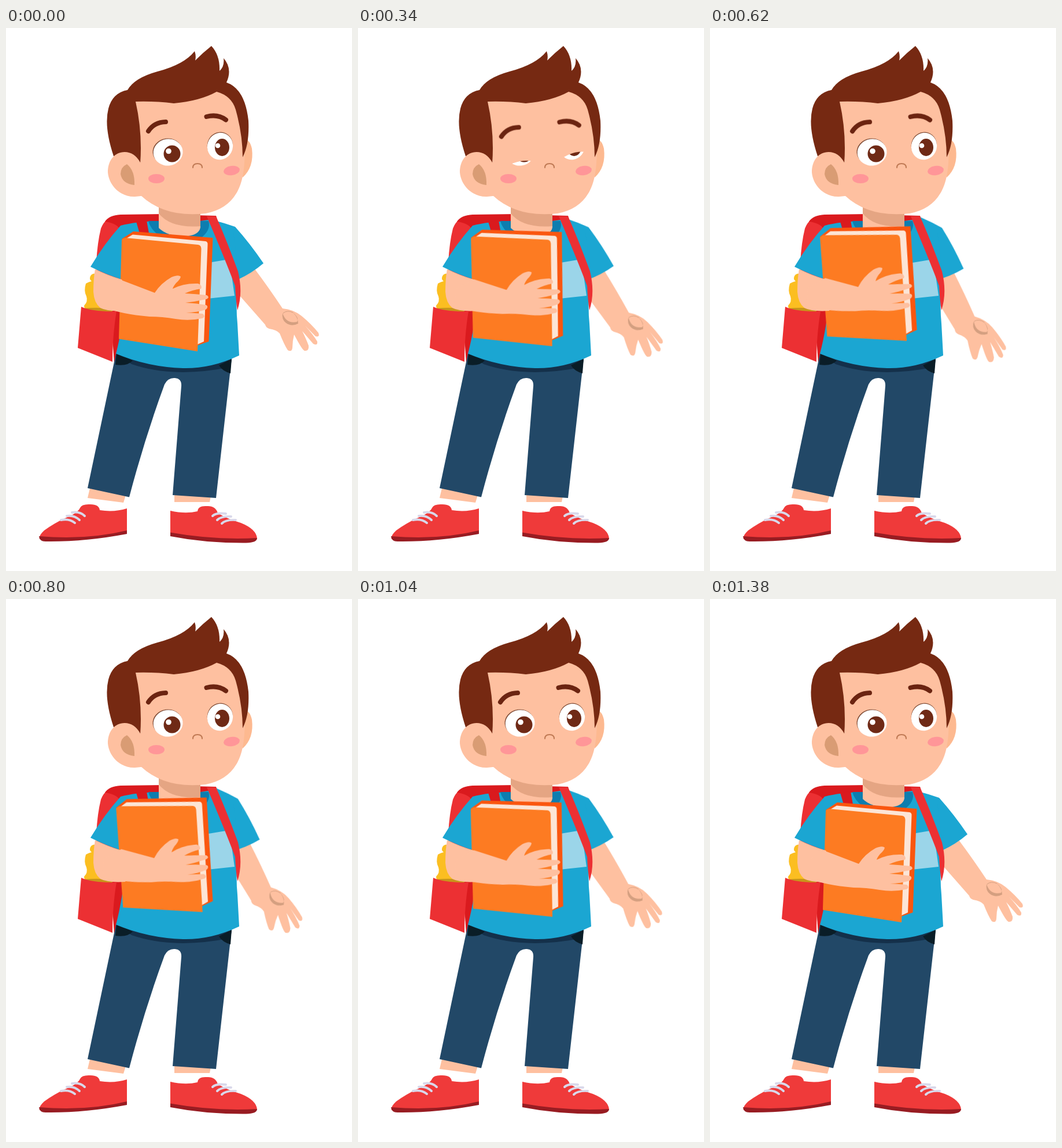
An HTML page that plays this animation: 598x937 px, repeating every 1400 ms.

```html
<!DOCTYPE html>
<html lang="en">
<head>
<meta charset="utf-8">
<title>Schoolboy with a book</title>
<style>
  html, body { margin: 0; width: 100%; height: 100%; overflow: hidden; background: #fff; }
  svg { display: block; width: 100%; height: 100%; }

  .skin { fill: #fec0a0; }
  .shade { fill: #e5a583; }
  .hair { fill: #762912; }
  .shirt { fill: #1ba6d2; }
  .collar { fill: #0d7daf; }
  .red { fill: #ec3033; }
  .deep { fill: #da1a1e; }
  .shoe { fill: #ef3a3a; }
  .sole { fill: #981c22; }
  .pants { fill: #224867; }
  .white { fill: #fff; }
  .iris { fill: #6f2a16; }
  .lash { fill: #7a4630; }
  .blush { fill: #ff9698; }
  .line { fill: none; stroke-linecap: round; }
  .brow { stroke: #6b2411; stroke-width: 8; }
  .lace { stroke: #d9d8ea; stroke-width: 4; }

  .swing { animation: 700ms cubic-bezier(.37, 0, .63, 1) infinite alternate; }
  #reach { transform-origin: 388px 372px; animation-name: reach; }
  .hold { transform-origin: 157px 461px; animation-name: hold; }
  @keyframes reach { to { transform: rotate(10.2deg); } }
  @keyframes hold { to { transform: rotate(-6deg); } }

  .lid, .frown { animation: 1400ms cubic-bezier(.37, 0, .63, 1) infinite; }
  .lid { animation-name: blink; }
  .frown { animation-name: frown; }
  @keyframes blink {
    0%, 14.3%, 45.7%, 100% { transform: none; }
    27.1%, 28.6% { transform: translateY(56px); }
  }
  @keyframes frown {
    0%, 14.3%, 45.7%, 100% { transform: none; }
    27.1%, 28.6% { transform: translate(2px, 10.5px); }
  }
</style>
</head>
<body>
<svg viewBox="0 0 598 937">
  <defs>
    <clipPath id="left"><circle cx="280" cy="214" r="29"/></clipPath>
    <clipPath id="right"><circle cx="370" cy="204" r="27"/></clipPath>
  </defs>

  <!-- backpack -->
  <path class="red" d="M156 405 Q158 370 164 346 Q172 325 195 323 L230 330 L230 480 L156 480Z"/>
  <path class="deep" d="M171 334 Q178 323 198 322 L275 321 V345 H195 Q190 337 171 334Z M325 323 L363 324 L368 340 H325Z"/>
  <path class="deep" d="M180 480 H215 L196 575 L187 577Z"/>
  <path fill="#fbbe21" d="M146 428 Q149 423 156 424 L185 440 L183 488 H146 Q134 486 135 479 Q142 472 139 463 Q134 454 138 441 Q143 438 148 437 Q143 433 146 428Z"/>
  <path fill="#c8961b" d="M134 484 Q160 481 184 485 V490 H138Z"/>
  <path class="red" d="M130 481 Q150 490 191 489 Q184 530 184 576 L124 552Z"/>

  <!-- legs and shoes -->
  <path class="skin" d="M145 794 L141 811 L203 819 L207 806Z M291 805 V818 L352 818 L354 808Z"/>
  <path class="pants" d="M190 562 L141 794 L213 809.500 Q240 707 274 615 Q280 603 292 604 Q304 605 303 618 L288 806 L363 811 L390 570Z"/>
  <path fill="#14304a" d="M191 562 Q290 590 390 570 L388 585 Q290 605 217 580Z"/>
  <path fill="#0a1d27" d="M191 561 L219 574 Q210 584 189 581Z M368 582 L390 571 L388 596 Q374 592 368 582Z"/>
  <path class="shoe" d="M128 828 Q131 821 146 822 Q161 822 162 832 Q187 836 209 829 V872 Q130 888 58 882 Q56 876 66 867 Q84 854 104 845 Q124 837 128 828Z"/>
  <path class="sole" d="M57 877 Q140 884 209 867 V873 Q135 887 68 886 Q58 886 57 877Z"/>
  <path class="shoe" d="M284 833 Q310 839 331 834 Q332 824 347 825 Q362 824 366 837 Q382 847 406 854 Q433 865 434 881 Q350 888 284 874Z"/>
  <path class="sole" d="M284 870.500 Q360 884 434 880 Q434 888 415 888.500 Q345 889 284 877Z"/>
  <g class="line lace">
    <path d="M95 849 Q109 846 119 854 M105 842 Q118 840 127 849 M114 836 Q128 834 136 842"/>
    <path d="M357 842 Q363 836 380 838 M365 849 Q372 842 389 843 M373 855 Q380 848 397 849"/>
  </g>

  <!-- free arm -->
  <g id="reach" class="swing">
    <path class="skin" d="M395 400 L430 416 Q454 448 478 484 Q498 486 511 497 Q528 511 540 526 Q543 534 535 532 L517 514 Q531 529 538 541 Q539 549 531 545 L512 523 Q519 537 523 548 Q524 558 516 557 Q512 556 498 529 Q495 540 495 552 Q494 560 487 556 Q481 547 473 527 Q468 521 455 519 Q449 517 448 512 L404 462 L392 430Z"/>
    <path fill="#d49f80" d="M478 492 Q476 503 484 509 Q494 516 505 510 Q505 500 496 491 Q507 500 503 507 Q484 511 478 492Z"/>
    <path class="line" stroke="#d49f80" d="M479 492 Q486 486 496 491"/>
    <path class="shirt" d="M355 331 Q376 336 396 343 Q422 372 445 406 Q425 423 401 434 L370 410Z"/>
  </g>

  <!-- shirt -->
  <path class="shirt" d="M198 341 Q224 334 264 333 H336 L350 331 Q372 333 392 345 L403 432 Q396 470 400 510 L403 565 Q355 588 306 587 Q245 585 190 562 Q201 520 206 470 L200 434 Q172 425 146 412 Q170 372 198 341Z"/>
  <path fill="#9bd5e9" d="M320 410 L386 399 L395 462 L320 470Z"/>
  <path class="red" d="M347 325 H363 Q380 363 401 420 Q410 457 400 487 Q397 468 396 445 Q377 395 347 325Z"/>
  <path class="deep" d="M225 334 L243 332 L249 365 H234Z"/>

  <!-- neck -->
  <path class="collar" d="M246 333 H350 Q355 349 335 364 Q295 372 264 358 Q249 346 246 333Z"/>
  <path class="skin" d="M264 300 H336 V344 Q334 356 315 359 Q280 361 264 345Z"/>
  <path class="shade" d="M264 300 H336 V342 Q285 346 264 320Z"/>

  <!-- head -->
  <path fill="#fdb990" d="M405 195 Q420 186 425 208 Q429 240 409 258Z"/>
  <path class="skin" d="M220 120 Q320 85 398 120 Q420 200 409 256 Q398 310 345 320 Q275 328 233 289Z"/>
  <path class="hair" d="M186 221 Q169 170 177 139 Q184 112 210 107 Q222 86 262 75 Q308 63 326 40 Q329 48 327 56 Q341 42 355 31 Q370 47 369 74 Q378 66 376 52 Q392 70 381 94 Q413 105 419 160 Q421 200 409 223 Q409 184 397 141 Q390 117 364 110 Q335 126 290 130 Q258 126 224 127 Q236 180 232 234Z"/>
  <path class="skin" d="M232 232 Q222 214 205 214 C188 214 176 228 176 249 C178 272 198 292 223 291 L243 289 L250 240Z"/>
  <path fill="#d99c74" d="M209 235 Q198 240 198 252 Q201 269 222 271 Q223 246 209 235Z"/>
  <ellipse class="blush" cx="260" cy="260" rx="14" ry="8"/>
  <ellipse class="blush" cx="390" cy="246" rx="14" ry="8" transform="rotate(-8 390 246)"/>
  <path class="line" stroke="#c07a55" stroke-width="2" d="M323 241 Q323 234 331 234 Q339 234 339 241"/>

  <!-- eyes -->
  <g clip-path="url(#left)">
    <ellipse class="lash" cx="279" cy="213" rx="25.500" ry="22.500" transform="rotate(-8 279 213)"/>
    <ellipse class="white" cx="280" cy="214.500" rx="25.500" ry="23" transform="rotate(-8 280 214)"/>
    <circle class="iris" cx="287" cy="217" r="14.500"/>
    <circle class="white" cx="281" cy="212.500" r="4.800"/>
    <path class="skin lid" d="M245 100 H315 V184 Q281 170 245 196Z"/>
  </g>
  <g clip-path="url(#right)">
    <ellipse class="lash" cx="370" cy="202.500" rx="22" ry="23" transform="rotate(18 370 202)"/>
    <ellipse class="white" cx="370" cy="204" rx="22" ry="23.500" transform="rotate(18 370 204)"/>
    <ellipse class="iris" cx="373.500" cy="206" rx="12.500" ry="15"/>
    <circle class="white" cx="366" cy="203" r="4.300"/>
    <path class="skin lid" d="M340 95 H400 V165 Q369 158 340 185Z"/>
  </g>
  <g class="line brow frown">
    <path d="M246 178 Q256 162.500 276 162"/>
    <path d="M346.500 153 Q366 148 380 158.500"/>
  </g>

  <!-- book -->
  <g class="hold swing">
    <path fill="#fa560f" d="M200 364 L220 351 L357.500 362 L350.500 541 L330 548Z"/>
    <path fill="#fce5d6" d="M208 363 L219 356.500 L345 368 Q349 369 348.500 374 L342 541 L331 546 L325 385Z"/>
    <path fill="#fd7b22" d="M200 367 Q200 363 206 362 L332 374 Q337.500 375 337.500 381 L331 558 L195 536.500Z"/>
  </g>

  <!-- holding arm -->
  <path class="skin" d="M154 416 Q176 427 200 434 Q222 460 206 488 Q177 490 163 483 Q152 474 151 455 Q151 433 154 416Z"/>
  <g class="hold swing">
    <path class="skin" d="M202 436 L257 457 Q268 440 286 430 Q298 425 302 429 Q301 434 294 440 Q289 446 288 450 Q307 440 332 441 Q340 444 337 450 Q322 452 309 458 Q328 459 347 461 Q353 465 346 468 Q328 472 310 474 Q329 475 346 478 Q351 481 345 486 Q330 491 311 491 L340 493 Q346 498 339 501 Q316 506 293 502 Q270 498 248 498 Q200 494 165 481 L170 450Z"/>
  </g>
</svg>
</body>
</html>
```
